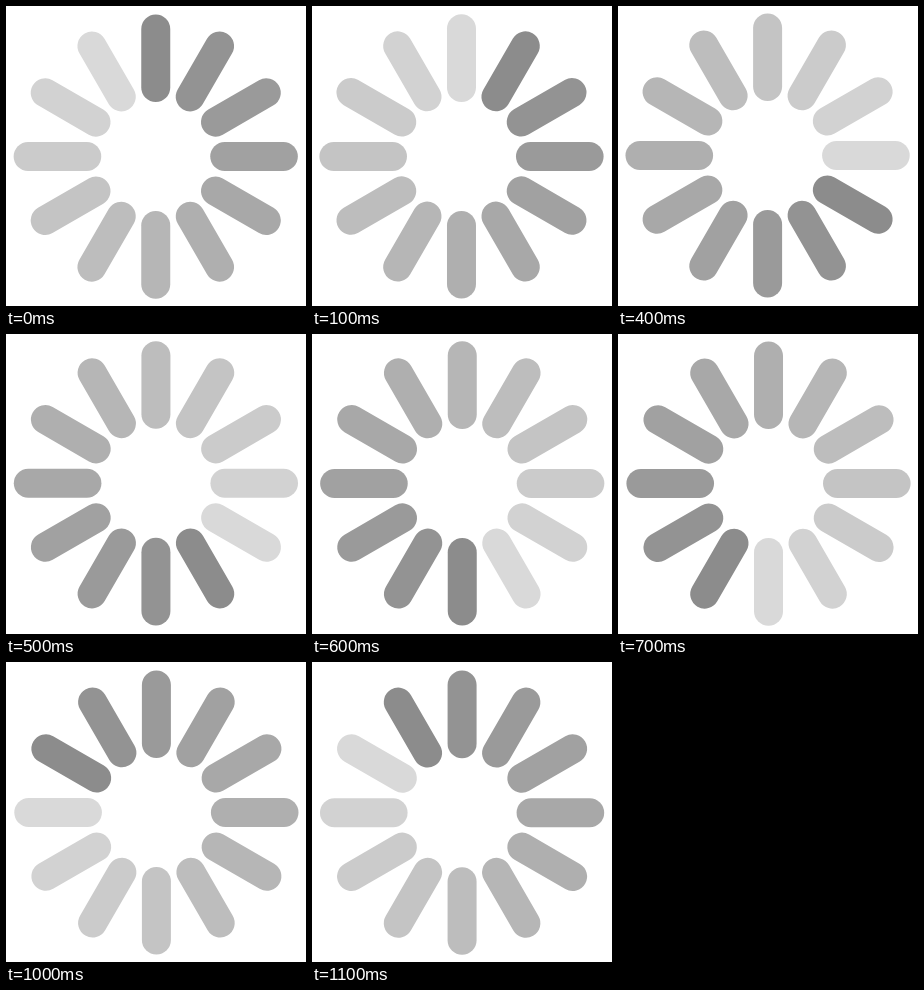
An HTML page that plays this animation: 300x300 px, repeating every 1200 ms.

```html
<!DOCTYPE html>
<html lang="en">
<head>
<meta charset="utf-8">
<title>Spinner</title>
<style>
  html, body { margin: 0; width: 100%; height: 100%; overflow: hidden; background: #fff; }
  svg { display: block; width: 100%; height: 100%; }
  line { stroke-width: 29; stroke-linecap: round; }
</style>
</head>
<body>
<svg viewBox="0 0 300 300"><g id="wheel"></g></svg>
<script>
  const BARS = 12;
  const LOOP = 1200;
  const STEP_ANGLE = 360 / BARS;
  const wheel = document.getElementById('wheel');

  function addBar(index) {
    const bar = document.createElementNS('http://www.w3.org/2000/svg', 'line');
    const shade = 140 + 7 * index;
    const attributes = {
      y1: -69,
      y2: -127.6,
      stroke: `rgb(${shade},${shade},${shade})`,
      // The hub sits slightly off the pivot, so the wheel wobbles as it turns.
      transform: `translate(149.75 150.6) rotate(${index * STEP_ANGLE})`
    };
    for (const [name, value] of Object.entries(attributes)) bar.setAttribute(name, value);
    wheel.append(bar);
  }

  function render(time) {
    const step = Math.floor((time % LOOP) / (LOOP / BARS));
    wheel.setAttribute('transform', `rotate(${step * STEP_ANGLE} 150 150)`);
  }

  for (let i = 0; i < BARS; i++) addBar(i);

  const start = performance.now();
  function tick() {
    render(performance.now() - start);
    requestAnimationFrame(tick);
  }
  tick();
</script>
</body>
</html>
```
